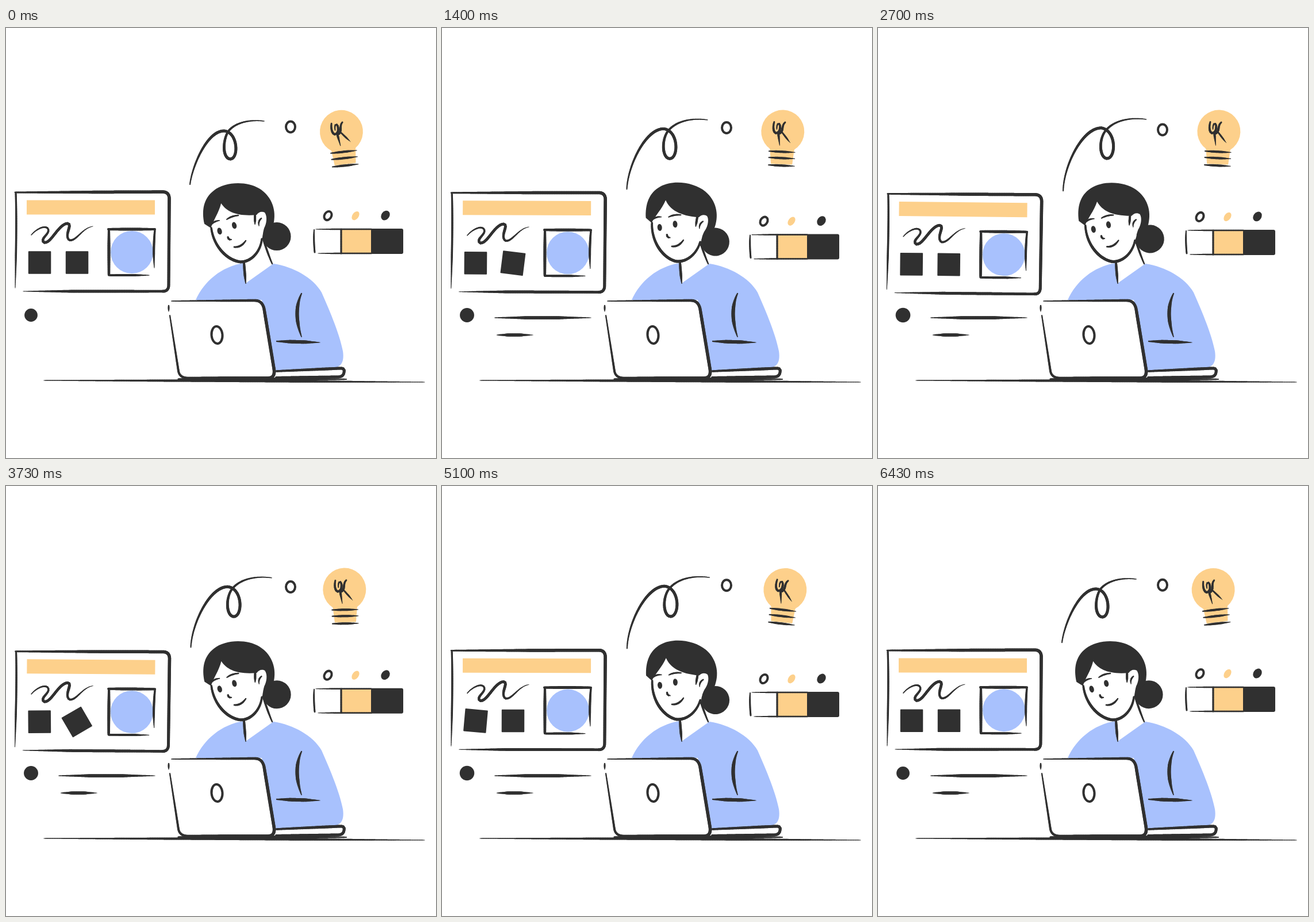
An HTML page with a canvas that plays this animation: 748x748 px, repeating every 6510 ms.

```html
<!DOCTYPE html>
<html lang="en">
<head>
<meta charset="utf-8">
<title>Designer at work</title>
<style>
  html, body { margin: 0; width: 100%; height: 100%; overflow: hidden; background: #fff; }
  canvas { display: block; width: 100%; height: 100%; }
</style>
</head>
<body>
<canvas id="stage" width="748" height="748"></canvas>
<script>
const LOOP = 6510, STEPS = 130;
const DARK = '#303030', BLUE = '#a8c1fd', SAND = '#fdd08b', WHITE = '#fff';
const RAD = Math.PI / 180;
const g = document.getElementById('stage').getContext('2d');

// ---------- drawing ----------
const traced = new Map();

// Evenly spaced points along an SVG path.
function trace(d) {
  if (!traced.has(d)) {
    const path = document.createElementNS('http://www.w3.org/2000/svg', 'path');
    path.setAttribute('d', d);
    const len = path.getTotalLength(), n = Math.ceil(len / 3);
    traced.set(d, Array.from({ length: n + 1 }, (_, i) => path.getPointAtLength(len * i / n)));
  }
  return traced.get(d);
}

// Brush stroke: full width in the middle, thinning to the given shares at its ends.
function ink(d, width, head = .4, tail = .4) {
  const pts = trace(d), n = pts.length - 1;
  g.strokeStyle = DARK;
  g.lineCap = 'round';
  for (let i = 1; i <= n; i++) {
    const t = i / n;
    g.lineWidth = width * Math.min(1, head + (1 - head) * t * 3, tail + (1 - tail) * (1 - t) * 3);
    g.beginPath();
    g.moveTo(pts[i - 1].x, pts[i - 1].y);
    g.lineTo(pts[i].x, pts[i].y);
    g.stroke();
  }
}

function fill(d, color) {
  g.fillStyle = color;
  g.fill(new Path2D(d));
}

function box(x, y, w, h, color, r = 0) {
  g.fillStyle = color;
  g.beginPath();
  g.roundRect(x, y, w, h, r);
  g.fill();
}

function oval(x, y, rx, ry, color, tilt = 0, line = 0) {
  g.beginPath();
  g.ellipse(x, y, rx, ry, tilt * RAD, 0, 7);
  g.lineWidth = line;
  g.strokeStyle = g.fillStyle = color;
  line ? g.stroke() : g.fill();
}

// Runs draw() turned by deg around (x, y) and lowered by dy.
function posed(x, y, deg, dy, draw) {
  g.save();
  g.translate(x, y + dy);
  g.rotate(deg * RAD);
  g.translate(-x, -y);
  draw();
  g.restore();
}

function clipped(x, y, w, h, draw) {
  g.save();
  g.beginPath();
  g.rect(x, y, w, h);
  g.clip();
  draw();
  g.restore();
}

// ---------- motion ----------
const wave = (k, turns, peak) => Math.cos((k / STEPS * turns * 360 - peak) * RAD);
const bump = (k, mid, width, power = 2) => Math.exp(-(Math.abs((k - mid) / width) ** power));
const ramp = (k, from, to) => Math.max(0, Math.min(1, (k - from) / (to - from)));
// Opens quickly, wavers, and closes at the end of the loop.
const opening = k => (1 - Math.cos(Math.PI * k / STEPS) ** 24) * (.9 - .15 * wave(k, 3, 240));

// Path between two paths of the same build.
function blend(a, b, u) {
  const ends = b.match(/\d+/g);
  return a.replace(/\d+/g, v => (+v + (ends.shift() - v) * u).toFixed(1));
}

// ---------- parts ----------
function panel(k) {
  const sway = (wave(k, 4, 190) + 1) / 2, h = k % 65;
  const spins = [
    5 * (bump(h, 37, 6) - bump(h, 18, 6)),
    7 * bump(h, 28, 4) - 34 * bump(h, 14, 7, 4),
  ];
  posed(150, 372, .65 * sway, 4.4 * sway, () => {
    ink('M17 287Q19 340 16 452', 3.5, .9, .3);
    ink('M16 286L274 285Q284 286 284 297L283 447Q283 458 273 458', 5.5, .5, .9);
    ink('M275 458L150 458L30 458', 5, .9, .2);
    box(36, 299.5, 223, 25, SAND);
    ink('M44 360C52 350 68 342 73 349C78 358 58 366 66 373C78 376 90 343 106 340' +
        'C118 340 100 360 110 369C122 372 132 348 151 345', 4.8, .3, .2);
    spins.forEach((deg, i) => posed(58.5 + 65 * i, 408, deg, 0, () =>
      box(38.8 + 65 * i, 388.3, 39.5, 39.5, DARK, 1)));
    const r = 37 + 5 * bump(h, 18, 4);
    clipped(181, 352, 76, 77, () => oval(219, 390, r, r, BLUE));
    ink('M178 350H259', 5, .8, .8);
    ink('M179 351V429', 5, .8, .9);
    ink('M259 351Q256 385 258 417', 4, .8, .3);
    ink('M179 430H249', 4, .9, .3);
  });
}

function notes(k, open) {
  const r = 11.4 + 1.4 * open;
  oval(43.5, 499.5, r, r, DARK);
  clipped(90, 496, 170 * ramp(k, 3, 16), 16, () => ink('M92 504H259', 5.5, .2, .2));
  clipped(94, 526, 66 * ramp(k, 18, 27), 16, () => ink('M96 534H158', 5.5, .2, .2));
}

function curl(open) {
  const rest = 'M320 272C324 240 350 178 380 179C404 182 405 228 390 228C374 226 378 186 390 176C402 164 425 159 449 162';
  const wide = 'M322 283C323 240 355 174 388 174C415 178 414 227 398 227C384 226 383 190 398 176C412 161 438 155 466 159';
  ink(blend(rest, wide, open), 5, .4, .3);
}

function bulb(k) {
  posed(590, 240, 7.2 * wave(k, 3, 160), 0, () => {
    oval(590.5, 180, 37.5, 37.5, SAND);
    fill('M569 208H612L609 237H572Z', SAND);
    [215, 226, 239].forEach(y => ink(`M568 ${y}L613 ${y + .5}`, 4, .4, .3));
    ink('M575 164C571 180 579 190 585 178C588 164 579 162 580 176', 4, .7, .5);
    ink('M594 164C587 170 593 182 583 184L586 204', 4, .7, .3);
    ink('M589 181L604 199', 3, .8, .3);
  });
}

function palette(k) {
  posed(0, 0, 0, 4.9 * (1 + wave(k, 2, 172)), () => {
    oval(560, 326.5, 6, 8, DARK, 30, 4);
    oval(608, 326.5, 5.5, 8.5, SAND, 35);
    oval(660, 326, 7, 9, DARK, 35);
    box(583, 350, 53, 42, SAND);
    box(635, 349, 56, 44, DARK, 3);
    ink('M536 351Q535 370 537 390', 3, .6, 1);
    ink('M539 350H636', 2.5, .4, 1);
    ink('M543 392H636', 2.5, .4, 1);
    ink('M583 350V392', 3, 1, 1);
  });
}

function body() {
  fill('M330 473C345 440 375 415 413 409L417 444L465 410C500 415 535 435 549 460' +
       'C560 485 580 530 586 562C589 582 582 590 570 591L468 597L445 473Z', BLUE);
  ink('M414 407Q415 425 417 444', 4.5, .8, .4);
  ink('M514 462C503 485 505 512 514 537', 6, .3, .3);
  ink('M471 545L546 547', 6, .3, .2);
  ink('M445 358Q452 384 463 410', 3.5, .7, .7);
}

function head(k) {
  const c = wave(k, 2, 202);
  const lean = 4.9 * (1 + c * (1.5 - .5 * c * c) + .1 * (1 - c * c));
  posed(415, 394, lean, 0, () => {
    oval(471, 362.5, 24.5, 24.5, DARK);
    fill('M345 341C340 318 343 297 361 283C381 267 418 266 440 279C460 291 470 313 466 337' +
         'C464 348 456 354 448 358L400 345L358 349Z', DARK);
    fill('M356 349C360 335 370 322 374 305C384 320 402 328 436 325C439 320 445 318 450 321' +
         'C455 328 453 341 449 348C446 358 446 368 444 376C436 396 424 406 409 407' +
         'C385 404 362 382 356 349Z', WHITE);
    ink('M357 348C361 380 385 405 409 407C428 406 443 388 445 367', 5, .7, .7);
    ink('M358 341Q362 336 371 335', 3, .7, .6);
    ink('M384 333Q392 327 404 326', 3, .5, .8);
    ink('M433 325V341', 4, 1, .5);
    ink('M444 331Q438 336 440 344', 3, .6, .5);
    oval(371.5, 353.5, 4, 6, DARK, -15);
    oval(397, 343.5, 4, 6, DARK, -15);
    ink('M386 364Q387 369 392 368', 3.5, .7, .6);
    // The smile keeps its own slant.
    posed(407, 377, -lean, 0, () => ink('M397 381Q409 382 417 370', 3.5, .7, .7));
  });
}

function desk() {
  fill('M285 475L435 474Q446 475 448 486L467 600Q467 610 455 609H312Q302 608 300 597Z', WHITE);
  fill('M468 597L588 591Q590 602 582 607L468 609Z', WHITE);
  ink('M66 613L300 613.5L728 616', 4, .3, .3);
  ink('M300 611H592', 5.5, .6, .4);
  ink('M288 475L433 474Q446 474 449 489L466 592Q469 608 457 609L318 609Q302 609 300 597L285 500', 5.5, .3, .4);
  ink('M283 483V493', 3);
  ink('M470 597L580 592Q590 591 588 599Q587 607 577 607L470 608', 5, .7, .8);
  oval(367, 534, 9.5, 15, DARK, -5, 4);
}

function render(ms) {
  const k = Math.min(STEPS - 1, 2 * Math.floor(ms / 100) + (ms % 100 >= 30 ? 1 : 0));
  const open = opening(k);
  g.fillStyle = WHITE;
  g.fillRect(0, 0, 748, 748);
  panel(k);
  notes(k, open);
  curl(open);
  oval(495, 175 + 3 * wave(k, 4, 190), 8, 9.5, DARK, 0, 4);
  bulb(k);
  palette(k);
  body();
  head(k);
  desk();
}

const start = performance.now();
function tick() {
  render((performance.now() - start) % LOOP);
  requestAnimationFrame(tick);
}
tick();
</script>
</body>
</html>
```
